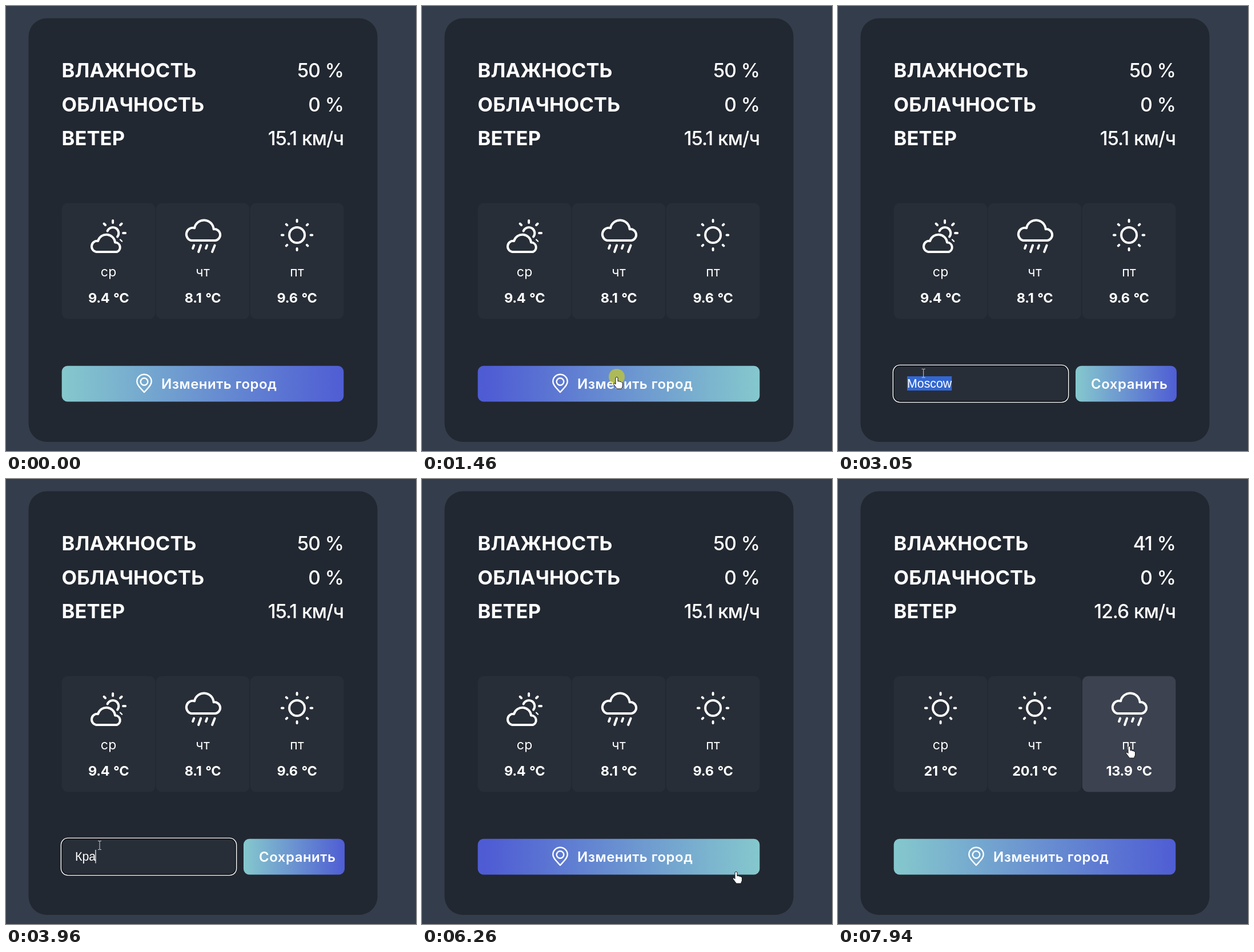
Write an HTML page that moves like this. It is 718 by 780 pixels and loops after 8 s.

```html
<!DOCTYPE html>
<html lang="ru">
<head>
<meta charset="utf-8">
<title>Погода</title>
<style>
  html, body { margin: 0; width: 100%; height: 100%; overflow: hidden; background: #343d4b; }
  svg { display: block; width: 718px; height: 780px; }
  text { font-family: Inter, "Open Sans", sans-serif; fill: #fff; }
  .label { font-size: 34.5px; font-weight: 700; letter-spacing: .1px; }
  .value { font-size: 33.5px; font-weight: 500; letter-spacing: -1px; word-spacing: 1px; text-anchor: end; }
  .day { font-size: 23px; font-weight: 400; letter-spacing: .3px; text-anchor: middle; }
  .temp { font-size: 23.5px; font-weight: 700; letter-spacing: -.3px; word-spacing: 1.5px; text-anchor: middle; }
  .action { font-size: 24px; font-weight: 640; letter-spacing: .5px; }
  .field { font-family: "Liberation Sans", Arial, sans-serif; font-size: 21.33px; }
  .icon { fill: none; stroke: #fff; stroke-width: 4; stroke-linecap: round; stroke-linejoin: round; }
</style>
</head>
<body>
<svg viewBox="0 0 718 780">
  <defs>
    <linearGradient id="editFill" gradientUnits="userSpaceOnUse" x1="98" x2="1084">
      <stop offset="0" stop-color="#85c8cd"/><stop offset=".51" stop-color="#4e5bd4"/><stop offset="1" stop-color="#85c8cd"/>
    </linearGradient>
    <linearGradient id="saveFill" href="#editFill" gradientUnits="userSpaceOnUse" x1="416" x2="770"/>
    <g id="sun" class="icon">
      <circle cy="401.5" r="13.5"/>
      <path d="M0 375V378M0 425V428M-26.7 401.5H-24M24 401.5H26.7M-18.8 382.7L-17.3 384.2M18.8 382.7L17.3 384.2M-18.8 420.3L-17.3 418.8M18.8 420.3L17.3 418.8"/>
    </g>
    <g id="rain" class="icon">
      <path d="M-20.5 411H22A10 10 0 0 0 19 391.2A16.9 16.9 0 0 0 -14.5 389.3A11.2 11.2 0 0 0 -20.5 411Z"/>
      <path d="M-15.5 419.5L-17.5 425M-3.5 419.5L-7.5 431M7.5 419.5L5.5 425M21 419.5L16.5 431"/>
    </g>
    <g id="partly" class="icon">
      <path d="M-21.5 431H14.5A8.5 8.5 0 0 0 11.5 414.5A15.3 15.3 0 0 0 -18.5 412A9.6 9.6 0 0 0 -21.5 431Z"/>
      <path d="M-2 394.5A10.2 10.2 0 1 1 15.5 404.5"/>
      <path d="M7.5 376V380M-8 381.5L-5.5 384M23 381.5L20.5 384M25.5 398H29.5"/>
      <path d="M20.5 409.5L23.5 412.5" stroke-width="2.4"/>
    </g>
  </defs>

  <rect width="718" height="780" fill="#343d4b"/>
  <rect x="39.5" y="21.5" width="611" height="742.5" rx="32" fill="#222831"/>

  <text class="label" x="97.5" y="125">ВЛАЖНОСТЬ</text>
  <text class="label" x="97.5" y="184.5">ОБЛАЧНОСТЬ</text>
  <text class="label" x="97.5" y="244">ВЕТЕР</text>
  <text class="value" id="humidity" x="591" y="125"></text>
  <text class="value" x="591" y="184.5">0 %</text>
  <text class="value" id="wind" x="591" y="244"></text>

  <g id="days"></g>

  <g id="edit">
    <rect x="97.7" y="630.7" width="493.6" height="62.8" rx="10" fill="url(#editFill)"/>
    <g class="icon" style="stroke-width:2.4">
      <path d="M242 677C236 670 229.3 665 229.3 658.2A12.7 12.4 0 0 1 254.7 658.2C254.7 665 248 670 242 677Z"/>
      <circle cx="242" cy="658.5" r="6.3"/>
    </g>
    <text class="action" x="272" y="671">Изменить город</text>
  </g>

  <g id="form">
    <rect x="98" y="630.7" width="304" height="62.8" rx="10" fill="#282e37"/>
    <g id="ring" fill="none">
      <rect x="97.9" y="630.9" width="304.2" height="62.2" rx="10.5" stroke="#101217" stroke-width="1.6"/>
      <rect x="96.4" y="629.4" width="307.2" height="65.2" rx="12" stroke="#fff" stroke-width="1.4"/>
    </g>
    <rect id="mark" y="649" height="25" fill="#3367d1"/>
    <text class="field" id="city" x="121" y="669"></text>
    <rect id="caret" y="650" width="1.2" height="23.5" fill="#fff"/>
    <rect x="416" y="630.7" width="177" height="62.8" rx="10" fill="url(#saveFill)"/>
    <text class="action" x="443" y="671">Сохранить</text>
  </g>

  <g id="pointer">
    <circle id="press" r="14" fill="#e1da00" fill-opacity=".57"/>
    <path id="hand" d="M-2 1.5Q0 -1 2 1.5V8Q4 6.5 5.5 8.5Q7 7.5 8.5 9.5Q10 9 10.5 11V16L8.5 21H.5L-5.5 13Q-6 10.5 -3.5 11L-2 13Z" fill="#fff" stroke="#14161a"/>
    <path id="beam" d="M-1 -6.5h2q1 0 1 1v13q0 1 -1 1h-2M5 -6.5h-2q-1 0 -1 1M5 8.5h-2q-1 0 -1 -1" fill="none" stroke="#d0d0d0"/>
    <path id="arrow" d="M0 0V17L4 13.3L6.6 19.3L9 18.2L6.5 12.4H12Z" fill="#fff" stroke="#14161a"/>
  </g>
</svg>
<script>
const LOOP = 8000;
const OPEN = 1590, FOCUS = 2360, CLOSE = 6190, UPDATE = 6610;
const $ = id => document.getElementById(id);
const show = (id, on) => { $(id).style.display = on ? '' : 'none'; };

// time, x, y
const path = [
  [330, 600, 772], [500, 545, 730], [640, 470, 688], [850, 385, 660], [1110, 341, 650],
  [1800, 341, 650], [1940, 232, 651], [2490, 232, 651], [2850, 106, 648], [3120, 162, 641],
  [5490, 162, 641], [5630, 262, 746], [5700, 262, 746], [5910, 440, 738], [6050, 550, 688],
  [7100, 550, 688], [7400, 535, 585], [7700, 515, 490], [7940, 510, 468]
];
const presses = [[1390, 1590], [2360, 2850], [6050, 6190]];

// time, field text
const typing = [[0, 'Moscow'], [3190, '']];
[3610, 3820, 3960, 4240, 4450, 4650, 4800, 4940, 5080]
  .forEach((at, i) => typing.push([at, 'Краснодар'.slice(0, i + 1)]));

const before = {
  humidity: '50 %', wind: '15.1 км/ч',
  days: [['partly', '9.4 °C'], ['rain', '8.1 °C'], ['sun', '9.6 °C']]
};
const after = {
  humidity: '41 %', wind: '12.6 км/ч',
  days: [['sun', '21 °C'], ['sun', '20.1 °C'], ['rain', '13.9 °C']]
};

$('days').innerHTML = ['ср', 'чт', 'пт'].map((name, i) => `
  <g transform="translate(${179.6 + i * 165} 0)">
    <rect x="-81.8" y="345.5" width="163.6" height="203" rx="10" fill="#282e37"/>
    <use/><text class="day" y="473.5">${name}</text><text class="temp" y="519.5"></text>
  </g>`).join('');
const cards = [...$('days').children];

const clamp = v => Math.min(1, Math.max(0, v));
const ramp = (t, start, length) => {
  const k = clamp((t - start) / length);
  return k * k * (3 - 2 * k);
};

function place(t) {
  const i = path.findIndex(p => p[0] > t);
  if (i < 0) return path[path.length - 1].slice(1);
  if (i === 0) return path[0].slice(1);
  const [t0, x0, y0] = path[i - 1], [t1, x1, y1] = path[i];
  const k = (t - t0) / (t1 - t0);
  return [x0 + (x1 - x0) * k, y0 + (y1 - y0) * k];
}

let shown;
function fill(data) {
  if (shown === data) return;
  shown = data;
  $('humidity').textContent = data.humidity;
  $('wind').textContent = data.wind;
  data.days.forEach(([icon, temp], i) => {
    cards[i].querySelector('use').setAttribute('href', '#' + icon);
    cards[i].querySelector('.temp').textContent = temp;
  });
}

function drawField(t, x) {
  const city = $('city');
  const [since, word] = typing.filter(s => s[0] <= t).pop();
  if (city.textContent !== word) city.textContent = word;
  const edge = n => 121 + (n ? city.getSubStringLength(0, n) : 0);
  const end = edge(word.length);

  let from = word.length;
  if (t > 2490 && t < 3190) {
    const reach = t < 2850 ? x : 0;
    while (from && (edge(from - 1) + edge(from)) / 2 > reach) from--;
  }
  const start = edge(from), selected = from < word.length;
  $('mark').setAttribute('x', start);
  $('mark').setAttribute('width', end - start);
  show('mark', selected);

  const focused = t >= FOCUS;
  const blinkOn = (t - Math.max(since, FOCUS)) % 1000 < 500;
  $('caret').setAttribute('x', end - .8);
  show('caret', focused && !selected && blinkOn);
  show('ring', focused);
}

function drawPointer(t, x, y, editing) {
  const inRow = y > 631 && y < 693;
  const inField = editing && inRow && x > 98 && x < 402;
  const onButton = inRow && x < 593 && x > (editing ? 416 : 98);
  const onCard = y > 345 && y < 548 && x > 98 && x < 591;
  const kind = inField ? 'beam' : onButton || onCard ? 'hand' : 'arrow';
  ['hand', 'beam', 'arrow'].forEach(id => show(id, id === kind));
  show('press', presses.some(([a, b]) => t >= a && t < b));
  show('pointer', t >= 330);
  $('pointer').setAttribute('transform', `translate(${x.toFixed(1)} ${y.toFixed(1)})`);
}

function slide(id, width, k) {
  $(id).setAttribute('gradientTransform', `translate(${-width * k} 0)`);
}

function draw(t) {
  const editing = t >= OPEN && t < CLOSE;
  const [x, y] = place(t);
  fill(t < UPDATE ? before : after);
  show('edit', !editing);
  show('form', editing);
  if (editing) drawField(t, x);

  slide('editFill', 493, t < CLOSE ? ramp(t, 630, 480) : 1 - ramp(t, 7130, 480));
  slide('saveFill', 177, ramp(t, 6035, 480));

  const lit = ramp(t, 7510, 200);
  const tone = [[40, 60], [46, 66], [55, 79]].map(([a, b]) => Math.round(a + (b - a) * lit));
  cards[2].firstElementChild.setAttribute('fill', `rgb(${tone})`);
  drawPointer(t, x, y, editing);
}

const begin = performance.now();
function tick() {
  draw((performance.now() - begin) % LOOP);
  requestAnimationFrame(tick);
}
tick();
</script>
</body>
</html>
```
